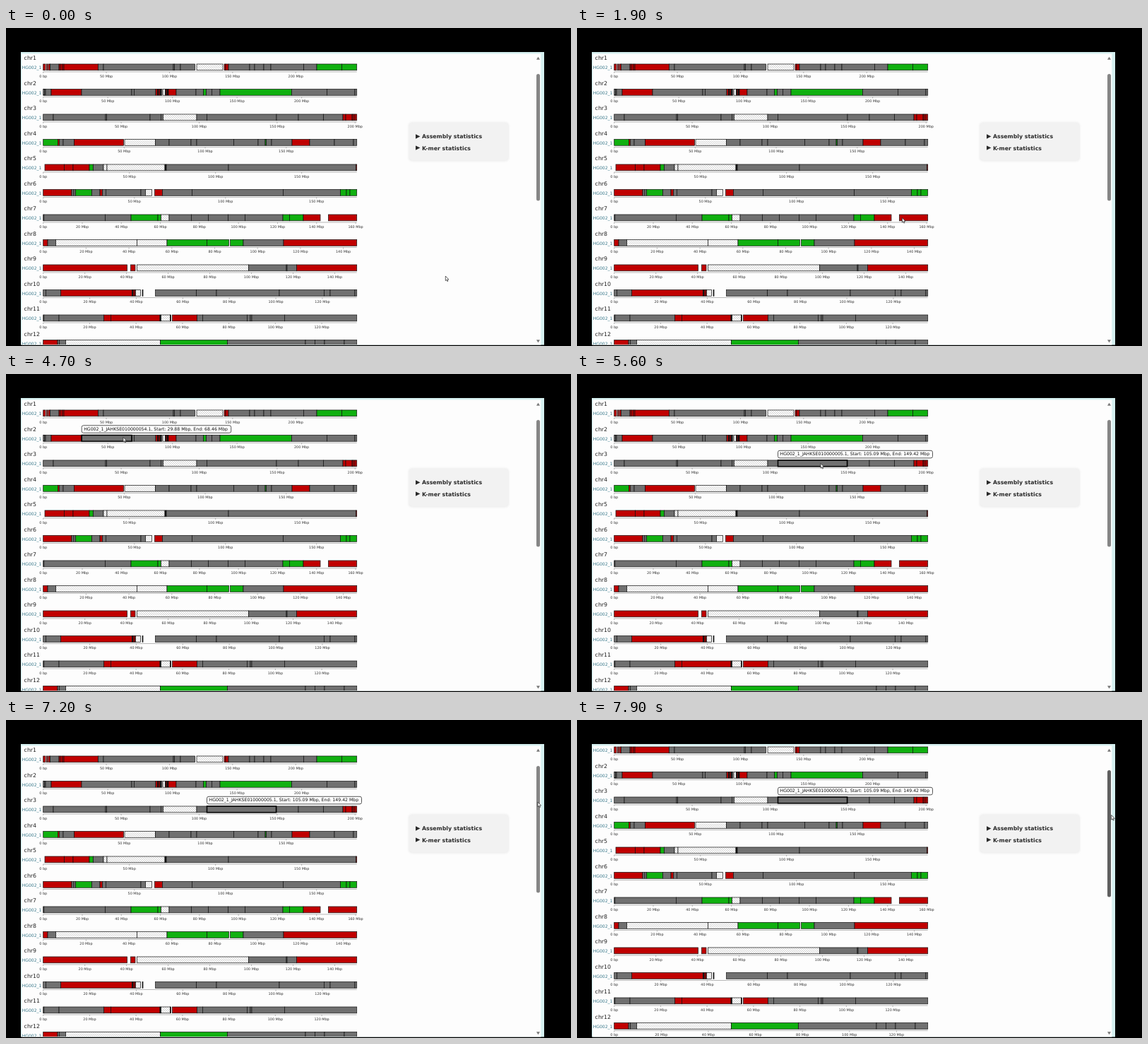
These frames come from a looping animation (800 by 450 pixels, 8000 ms). An HTML page:

```html
<!DOCTYPE html>
<html lang="en">
<head>
<meta charset="utf-8">
<title>Assembly ideogram</title>
<style>
html, body { margin: 0; width: 100%; height: 100%; overflow: hidden; background: #000; }
svg { display: block; font-family: "DejaVu Sans", Verdana, sans-serif; }
.name { font-size: 7.8px; fill: #222; }
.track { font-size: 6px; fill: #38788a; text-anchor: end; }
.tick { font-size: 4.9px; fill: #333; text-anchor: middle; }
.axis { stroke: #888; stroke-width: .6; fill: none; }
.seg { stroke: #111; stroke-width: .7; }
.stat { font-size: 7.8px; font-weight: bold; fill: #2a2a2a; }
.tip { font-size: 6.2px; fill: #111; }
</style>
</head>
<body>
<svg width="800" height="450" viewBox="0 0 800 450">
  <defs>
    <clipPath id="view"><rect x="22" y="36" width="736" height="412"/></clipPath>
    <pattern id="hatch" width="3" height="3" patternUnits="userSpaceOnUse">
      <rect width="3" height="3" fill="#fff"/>
      <path d="M-1-1 4 4M-1 2 1 4M2-1 4 1" stroke="#999" stroke-width=".5"/>
    </pattern>
    <filter id="soft" x="-10%" y="-20%" width="120%" height="140%"><feGaussianBlur stdDeviation="1.6"/></filter>
  </defs>
  <rect x="21" y="34" width="741" height="414.5" fill="#d5f0f0"/>
  <rect x="22.3" y="36.5" width="735" height="412" fill="#fdfdfd"/>
  <rect x="570" y="133.5" width="142" height="55" rx="5" fill="#ececec" filter="url(#soft)"/>
  <rect x="571" y="134" width="140" height="53.5" rx="5" fill="#f2f2f2"/>
  <path d="M580 150.3v6.4l6.4-3.2zM580 166.4v6.4l6.4-3.2z" fill="#2a2a2a"/>
  <text class="stat" x="589" y="156.4">Assembly statistics</text>
  <text class="stat" x="589" y="172.5">K-mer statistics</text>
  <g clip-path="url(#view)"><g id="page"></g></g>
  <path d="M751 44.7h5l-2.5-4zM751 441.3h5l-2.5 4z" fill="#777"/>
  <rect id="thumb" x="751" y="65" width="5" height="179.5" rx="2.5"/>
  <path id="cursor" d="M0 0V6.6L1.5 5.3 2.5 7.6 3.6 7.1 2.6 4.9H4.6Z" fill="#fff" stroke="#222" stroke-width=".7"/>
</svg>
<script>
const $ = id => document.getElementById(id);
const page = $('page');
const LEFT = 52.7, WIDTH = 444, PITCH = 35.5, BAR = 51, HEIGHT = 8.8;
const fills = { r: '#c00000', g: '#10b010', d: '#707070', k: '#111', h: 'url(#hatch)' };

function add(parent, tag, attrs, text) {
  const el = document.createElementNS('http://www.w3.org/2000/svg', tag);
  for (const k in attrs) el.setAttribute(k, attrs[k]);
  if (text) el.textContent = text;
  return parent.appendChild(el);
}

// One chromosome: length in Mbp, then segments as colour + right edge ("_" is a gap)
let rows = 0;
function chr(length, segments) {
  const g = add(page, 'g', { transform: `translate(0 ${rows++ * PITCH})` });
  add(g, 'text', { class: 'name', x: 25.6, y: 45 }, 'chr' + rows);
  add(g, 'text', { class: 'track', x: 50.3, y: 58.3 }, 'HG002_1');
  const step = length > 165 ? 50 : 20;
  let axis = `M${LEFT} 62H${LEFT + WIDTH}`;
  for (let m = 0; m <= length; m += step) {
    const x = LEFT + m / length * WIDTH;
    axis += `M${x} 62v2`;
    add(g, 'text', { class: 'tick', x, y: 69.6 }, m ? m + ' Mbp' : '0 bp');
  }
  add(g, 'path', { class: 'axis', d: axis });
  let x = LEFT;
  for (const s of segments.split(' ')) {
    const end = +s.slice(1);
    if (s[0] != '_')
      add(g, 'rect', { class: 'seg', x, y: BAR, width: end - x, height: HEIGHT, fill: fills[s[0]] });
    x = end;
  }
}

chr(248.4, 'r56 _57.5 r59 _60 r62.5 d75 r77 r80 r82 r130.5 d138 d237 d238.5 d247 d267.5 _270 h307 _309 r311 r315 d345 d352 d365 d375 d421.5 d440 g475.5 g496.7');
chr(242.7, 'd54.5 d56 d64 r107 d178 d181.5 d212 r214.5 k216 r218 k219.5 d221 _222 h225.5 k226.5 r228 k230 r241 d269 d279.5 g283.5 d291.5 d303 g404.5 d454.5 d494 d496.7');
chr(201.1, 'd67 d141 d142.5 d204 d219.5 d222.5 h270 d284.5 d383 d414 d449.5 d477 r481 r490 r491.5 r494 r496.7');
chr(193.6, 'g73.5 r75.5 d81 d96.5 r166.5 _168 h211.5 d231 d262 d270 d322.5 d357 d367 g368.5 d376 d405 r430 d465 d492 d496.7');
chr(182, '_55 r82.5 r95 r118 g123.5 d138 h143 h225 k227 d315 d495.5 r496.7');
chr(172.1, 'r93 d96 d98.5 g121.5 d133 r136.5 d141.5 d191 d197.5 h206.5 _210.5 r221.5 d263.5 d392.5 d473.5 g482 g487 g496.7');
chr(160.6, 'd53.8 d140.5 d177 g215 g219.5 h231 d262.5 d286.5 d314.5 d338.5 d392 g401.5 g421 r445 _456.5 r496.7');
chr(146.3, 'r59 d70.5 h185.5 h228 g284.5 g315.5 _317.5 g336 d393 r496.7');
chr(150.6, 'r171.5 _176.5 r183 _185.5 h343.5 d397 d398 d411.5 r496.7');
chr(134.8, 'd56.5 d77.5 r178.5 k180 r182 r183.5 h190.5 _193 k194 _211.5 d269.5 d298 d387 d450.5 d459 d494 d496.7');
chr(135.1, 'd53.8 d75 d138.5 r148.5 r218 k219.5 h232.5 k233.5 _235.5 r270.5 d278.5 d341.5 d346 d348 d394.5 d496.7');
chr(133.3, 'r73 d75.5 d84.5 h218.5 g313.5 d424 d437.5 d451 d479 d496.7');

// Hovered contig with its tooltip
function hover(row, x, end, width, id, from, to) {
  const g = add(page, 'g', { transform: `translate(0 ${row * PITCH})` });
  add(g, 'rect', { x, y: BAR, width: end - x, height: HEIGHT, fill: 'none', stroke: '#000', 'stroke-width': 1.5 });
  add(g, 'rect', { x, y: 37.3, width, height: 10.6, rx: 2.5, fill: '#fff', stroke: '#444', 'stroke-width': .9 });
  add(g, 'text', { class: 'tip', x: x + 3, y: 44.4 },
    `HG002_1_JAHKSE${id}.1, Start: ${from} Mbp, End: ${to} Mbp`);
  return g;
}
const tips = [
  { start: 2800, stop: 4700, el: hover(0, 130.3, 246.5, 215.5, '010000012', '43.46', '108.52') },
  { start: 4700, stop: 5200, el: hover(1, 107.2, 178, 211.5, '010000054', '29.88', '68.46') },
  { start: 5200, stop: 8000, el: hover(2, 284.5, 382.5, 219, '010000005', '105.09', '149.42') }
];

// Pointer path: time, x, y
const path = [
  [0, 622.3, 351], [1000, 622.3, 351], [1800, 470, 276], [2700, 189, 57.5], [3300, 189, 57.5],
  [3900, 166, 89.5], [4700, 166, 89.5], [5400, 345, 126.5], [6100, 345, 126.5], [6300, 742, 94],
  [6500, 742, 94], [6800, 747.3, 98], [7400, 755, 122.5], [7800, 755, 122.5], [7900, 756.7, 134.5]
];

function pointer(t) {
  const i = path.findIndex(p => p[0] > t);
  if (i < 0) return path[path.length - 1].slice(1);
  const [t0, x0, y0] = path[i - 1], [t1, x1, y1] = path[i];
  let k = (t - t0) / (t1 - t0);
  k = k * k * (3 - 2 * k);
  return [x0 + (x1 - x0) * k, y0 + (y1 - y0) * k];
}

function draw(now) {
  const t = Math.floor(now % 8000 / 100) * 100;
  const scrolled = t >= 7900;
  page.setAttribute('transform', `translate(0 ${scrolled ? -13 : 0})`);
  $('thumb').setAttribute('y', scrolled ? 71 : 65);
  $('thumb').setAttribute('fill', t >= 7300 ? '#606060' : '#868686');
  $('cursor').setAttribute('transform', `translate(${pointer(t)})`);
  for (const { start, stop, el } of tips)
    el.setAttribute('visibility', t >= start && t < stop ? 'visible' : 'hidden');
  requestAnimationFrame(draw);
}
draw(performance.now());
</script>
</body>
</html>
```
